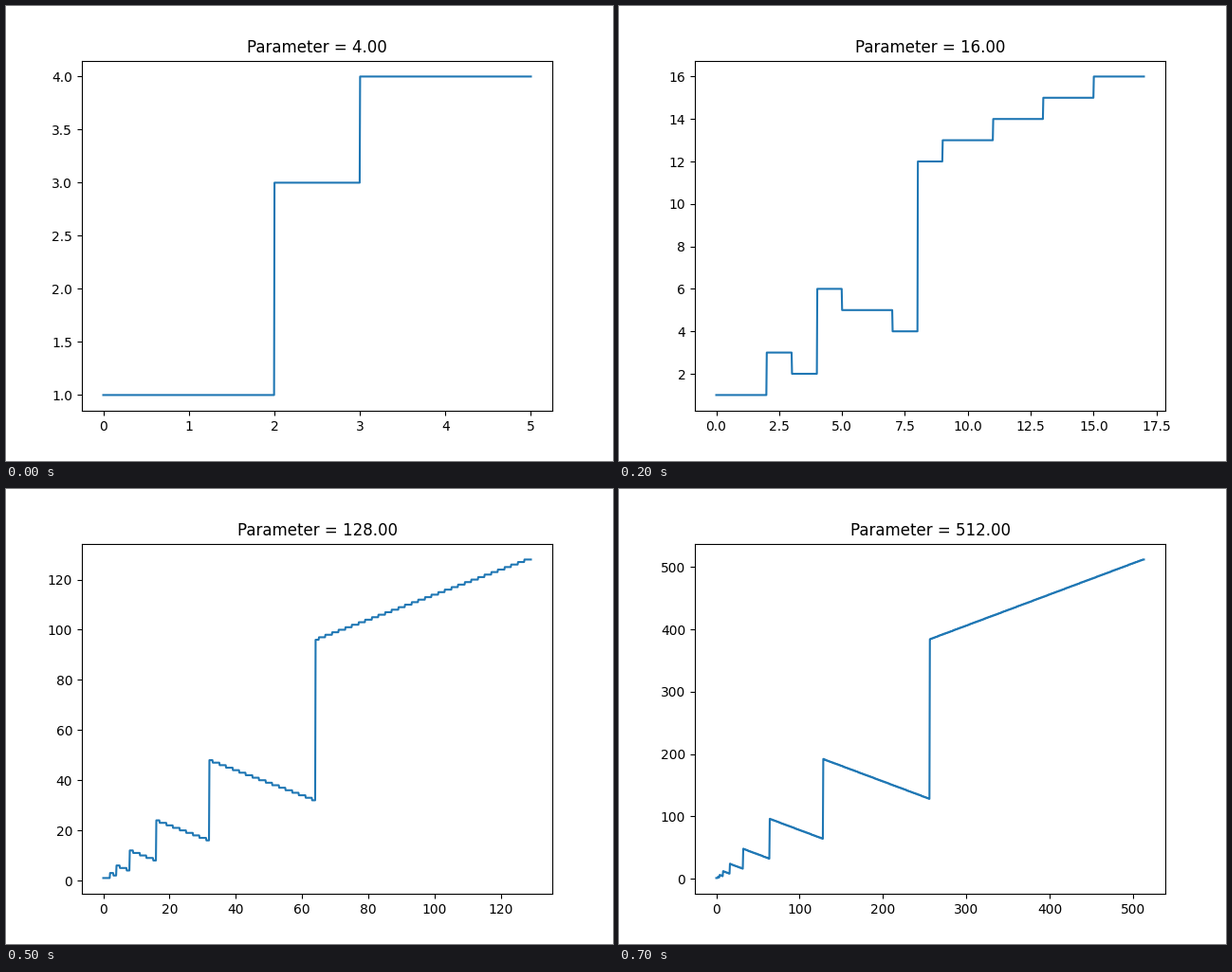
These frames come from a looping animation (640x480 px, 800 ms). A matplotlib script:

```python
import matplotlib.pyplot as plt
import numpy as np
from matplotlib.animation import FuncAnimation

FRAMES = 8
INTERVAL = 100
SAMPLES = 1000

fig, ax = plt.subplots(figsize=(6.4, 4.8), dpi=100)


def staircase(x, size):
    """Falling stairs on every block [b, 2b), rising stairs on the last one."""
    cell = np.clip(np.floor(x).astype(int), 1, size)
    block = 2 ** np.floor(np.log2(cell)).astype(int)
    block = np.minimum(block, size // 2)
    stairs = (cell - block + 1) // 2
    direction = np.where(block == size // 2, 1, -1)
    return np.where(cell < 2, 1, 3 * block // 2 + direction * stairs)


def update(frame):
    size = 2 ** (frame + 2)
    x = np.linspace(0, size + 1, SAMPLES)
    ax.clear()
    ax.plot(x, staircase(x, size))
    ax.set_title(f"Parameter = {size:.2f}")


anim = FuncAnimation(fig, update, frames=FRAMES, interval=INTERVAL,
                     init_func=lambda: None, repeat=True, repeat_delay=0)
plt.show()
```
